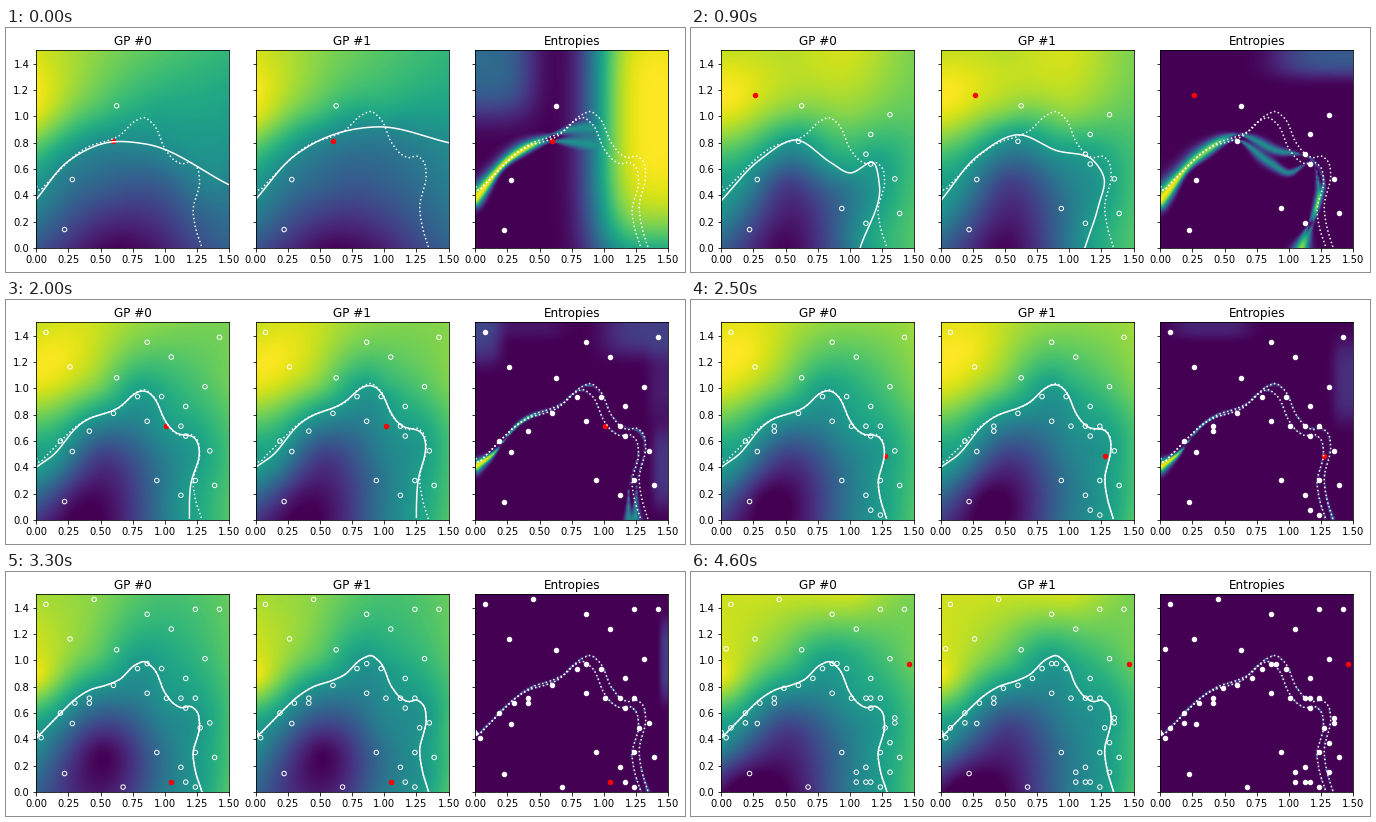
Recreate the animation shown at these times as a matplotlib script. Size 679 by 244 pixels, loop 4700 ms.

```python
import numpy as np
import matplotlib.pyplot as plt
from matplotlib.animation import FuncAnimation

W, H, DPI = 679, 244, 72
FRAMES, STEP_MS = 47, 100
SIDE, N = 1.5, 120

plt.rcParams.update({"font.family": "DejaVu Sans", "font.size": 10,
                     "axes.titlesize": 12, "axes.linewidth": 0.8})

axis = (np.arange(N) + 0.5) * SIDE / N
GRID = np.stack(np.meshgrid(axis, axis), -1).reshape(-1, 2)
NODES = np.array([(x, y) for y in (1.5, 1, 0.5, 0) for x in (0, 0.5, 1, 1.5)])
NODES = np.delete(NODES, [12, 13], axis=0)  # the cold spot rules that corner
LOW = [55, 20, 44, 70, 41, 73]


def smooth(flat, n=140):
    """Hermite curve through (x, y) pairs in hundredths, evenly sampled."""
    p = np.array(flat, float).reshape(-1, 2) / 100
    t = np.r_[0, np.cumsum(np.hypot(*np.diff(p, axis=0).T))]
    m = np.gradient(p, t, axis=0)
    s = np.linspace(0, t[-1], n)
    i = np.clip(np.searchsorted(t, s, "right") - 1, 0, len(t) - 2)
    h = (t[i + 1] - t[i])[:, None]
    u = (s - t[i])[:, None] / h
    return ((2*u**3 - 3*u**2 + 1) * p[i] + (u**3 - 2*u**2 + u) * h * m[i]
            + (3*u**2 - 2*u**3) * p[i + 1] + (u**3 - u**2) * h * m[i + 1])


def sq_dist(a, b):
    return (a[:, None, 0] - b[None, :, 0])**2 + (a[:, None, 1] - b[None, :, 1])**2


def plate(points, values):
    """Thin-plate surface on the grid."""
    def kernel(a):
        r2 = sq_dist(a, points)
        return 0.5 * r2 * np.log(r2 + 1e-12)

    n = len(points)
    poly = np.c_[np.ones(n), points]
    system = np.block([[kernel(points) + 2e-3 * np.eye(n), poly],
                       [poly.T, np.zeros((3, 3))]])
    c = np.linalg.solve(system, np.r_[values, np.zeros(3)])
    return kernel(GRID) @ c[:n] + np.c_[np.ones(len(GRID)), GRID] @ c[n:]


def outward(curve):
    """Second boundary: the first one pushed up and to the right."""
    x, y = curve.T
    ramp = np.clip(x / 0.85, 0, 1)
    return np.c_[x + 0.055 * ramp, y + 0.047 * ramp * np.clip(y / 0.5, 0, 1)]


def estimate(curve, pull, blur):
    """Early guess of a boundary: blurred, sagging, its foot pulled left."""
    half = blur // 2
    padded = np.pad(curve, ((half, half), (0, 0)), mode="edge")
    x, y = (np.convolve(c, np.ones(blur) / blur, "valid") for c in padded.T)
    foot = np.clip(1 - y / 0.5, 0, 1) * (x > 0.9)
    sag = 0.05 * np.exp(-((x - 0.15) / 0.12)**2)
    return np.c_[x - pull * foot**2, y - sag]


TRUTH = [0, 41, 8, 49, 20, 61, 31, 71, 43, 78, 54, 81, 64, 85, 78, 97, 84, 99,
         90, 95, 101, 74, 107, 67, 113, 64, 120, 65, 125, 61, 127, 52, 122, 28,
         124, 15, 129, 0]
true0 = smooth(TRUTH)
true1 = outward(true0)
hooked = smooth([0, 47, 2, 44] + TRUTH[2:], 300)
DOTTED = [hooked, outward(hooked)]

keys = []


def key(at, width, level, top, hot, cold, curves, haze=(), low=LOW, drop=0):
    """top: values at y = 1.5, then at y = 1 right of the edge."""
    state = {"at": at, "width": width}
    for i, curve in enumerate(curves):
        nodes = np.array(top[:4] + [95] + top[4:] + low, float)
        nodes[[3, 7]] -= drop * i
        on_line = curve[::12]
        state[f"curve{i}"] = curve
        state[f"mean{i}"] = plate(
            np.r_[NODES, [hot, cold], on_line],
            np.r_[nodes, 99, 1, np.full(len(on_line), level)] / 100)
    x, y = GRID.T
    state["haze"] = sum((a * np.exp(-((x - cx) / rx)**4 - ((y - cy) / ry)**4)
                         for cx, cy, rx, ry, a in haze), np.zeros(len(GRID)))
    keys.append(state)


key(0, 0.09, 48, [94, 82, 73, 66, 67, 57, 56], (0, 1.2), (0.58, 0),
    (smooth([0, 37, 25, 66, 55, 80, 85, 79, 150, 48]),
     smooth([0, 37, 30, 70, 60, 86, 95, 92, 150, 80])),
    [(1.5, 1, 0.6, 1.2, 1), (0, 1.5, 0.45, 0.5, 0.35)],
    low=[53, 33, 31, 43, 9, 31])
key(4, 0.12, 46, [97, 77, 54, 55, 63, 49, 53], (0, 1.2), (0.45, 0),
    (smooth([0, 37, 30, 69, 65, 81, 100, 70, 115, 35, 117, 0]),
     smooth([0, 37, 30, 71, 72, 87, 110, 72, 121, 50, 115, 0])),
    [(1.5, 1.2, 0.14, 0.5, 1), (1.5, 0.2, 0.1, 0.3, 0.3)], drop=16)
key(9, 0.10, 55, [91, 89, 93, 80, 78, 81, 75], (0.1, 1.15), (0.47, 0),
    (smooth([0, 36, 30, 67, 58, 82, 85, 65, 100, 57, 118, 65, 123, 48, 108, 0]),
     smooth([0, 36, 30, 71, 60, 86, 90, 74, 118, 67, 127, 53, 123, 33, 112, 0])),
    [(1.5, 1.5, 0.6, 0.2, 0.28)])
key(14, 0.09, 56, [86, 92, 81, 73, 80, 64, 75], (0.1, 1.15), (0.25, 0.02),
    (estimate(true0, 0.22, 9), estimate(true1, 0.22, 13)),
    [(0, 1.5, 0.2, 0.3, 0.45), (1.4, 1.5, 0.4, 0.25, 0.4),
     (1.5, 0.4, 0.12, 0.3, 0.35)], drop=-5)
key(25, 0.09, 55, [95, 90, 83, 86, 75, 61, 80], (0.2, 1.3), (0.33, 0.19),
    (estimate(true0, 0, 7), estimate(true1, 0, 7)),
    [(1.5, 1.05, 0.15, 0.3, 0.14), (0.4, 1.5, 0.3, 0.12, 0.1)])
key(33, 0.08, 53, [87, 81, 71, 77, 71, 58, 74], (0, 0.9), (0.52, 0.3),
    (true0, true1), [(1.5, 1, 0.06, 0.3, 0.18)])
key(46, 0.045, 55, [93, 92, 93, 80, 73, 60, 78], (0, 0.9), (0.15, 0.1),
    (true0, true1))

# Four starting samples, then one lattice query per frame.
START = [(0.22, 0.14), (0.28, 0.52), (0.625, 1.08), (0.60, 0.81)]
QUERIES = [(31, 23), (36, 14), (37, 7), (30, 19),
           (35, 27), (31, 17), (25, 8), (30, 5), (7, 31),
           (28, 33), (11, 18), (23, 20), (33, 8), (23, 36),
           (2, 38), (21, 25), (26, 25), (38, 37), (5, 16), (27, 19),
           (33, 19), (31, 2), (33, 1), (11, 19), (34, 13),
           (1, 11), (0, 12), (8, 18), (12, 39), (18, 1), (23, 26),
           (33, 37), (28, 2),
           (1, 29), (2, 13), (5, 14), (13, 21), (19, 23), (24, 26), (31, 19),
           (36, 15), (35, 10), (28, 4), (30, 2), (35, 4), (39, 26)]
SAMPLES = np.r_[np.array(START), np.array(QUERIES) * 0.0375]


def state_at(frame):
    i = max(k for k in range(len(keys) - 1) if keys[k]["at"] <= frame)
    a, b = keys[i], keys[i + 1]
    u = (frame - a["at"]) / (b["at"] - a["at"])
    return {name: (1 - u) * a[name] + u * b[name] for name in a}


def spread(points, scale=0.3):
    """Posterior deviation of an RBF process."""
    def rbf(a):
        return np.exp(-sq_dist(a, points) / (2 * scale**2))

    k = rbf(GRID)
    inv = np.linalg.inv(rbf(points) + 1e-3 * np.eye(len(points)))
    return np.sqrt(np.clip(1 - np.sum((k @ inv) * k, axis=1), 0, 1))


def entropy(state, points):
    width = np.maximum(state["width"] * spread(points), 0.004)
    ridge = sum(np.exp(-sq_dist(GRID, state[c]).min(axis=1) / width**2)
                for c in ("curve0", "curve1")) / 2
    return np.maximum(state["haze"], ridge)


fig = plt.figure(figsize=((W + 0.01) / DPI, (H + 0.01) / DPI), dpi=DPI,
                 facecolor="white")


def panel(left, title, labels):
    ax = fig.add_axes([left / W, 24 / H, 192.8 / W, 197.5 / H])
    ax.set_title(title)
    image = ax.imshow(np.zeros((N, N)), extent=(0, SIDE, 0, SIDE), vmin=0, vmax=1,
                      origin="lower", aspect="auto", cmap="viridis",
                      interpolation="bilinear")
    ax.set(xlim=(0, SIDE), ylim=(0, SIDE),
           xticks=np.arange(0, 1.51, 0.25), yticks=np.arange(0, 1.41, 0.2))
    ax.xaxis.set_major_formatter("{x:.2f}")
    ax.yaxis.set_major_formatter("{x:.1f}")
    ax.tick_params(labelleft=labels)
    return ax, image


panels = [panel(30.3, "GP #0", True), panel(249.8, "GP #1", False),
          panel(469.3, "Entropies", False)]
solids, dots, reds = [], [], []
for i, (ax, _) in enumerate(panels):
    for line in (DOTTED if i == 2 else [DOTTED[i]]):
        ax.plot(*line.T, color="white", ls=":", lw=1.5)
    if i < 2:
        solids += ax.plot([], [], color="white", lw=1.5)
    dots.append(ax.scatter([], [], s=20, lw=1, edgecolors="white", zorder=1.5,
                           facecolors="white" if i == 2 else "none"))
    reds.append(ax.scatter([], [], s=20, lw=1, color="red", zorder=1.6))
rise = np.linspace(0.5, 1.17, 40)
island, = panels[1][0].plot(1.4 + 0.1 * ((rise - 0.83) / 0.33)**2, rise,
                            color="white", lw=1.5)


def draw(frame):
    state = state_at(frame)
    points = SAMPLES[:frame + 4]
    fields = [state["mean0"], state["mean1"], entropy(state, points)]
    for (_, image), field in zip(panels, fields):
        image.set_data(np.clip(field, 0, 1).reshape(N, N))
    for i, line in enumerate(solids):
        line.set_data(*state[f"curve{i}"].T)
    for ring, red in zip(dots, reds):
        ring.set_offsets(points[:-1])
        red.set_offsets(points[-1:])
    island.set_visible(3 <= frame <= 5)


anim = FuncAnimation(fig, draw, frames=FRAMES, interval=STEP_MS,
                     init_func=lambda: draw(0), repeat=True, repeat_delay=0)
plt.show()
```
